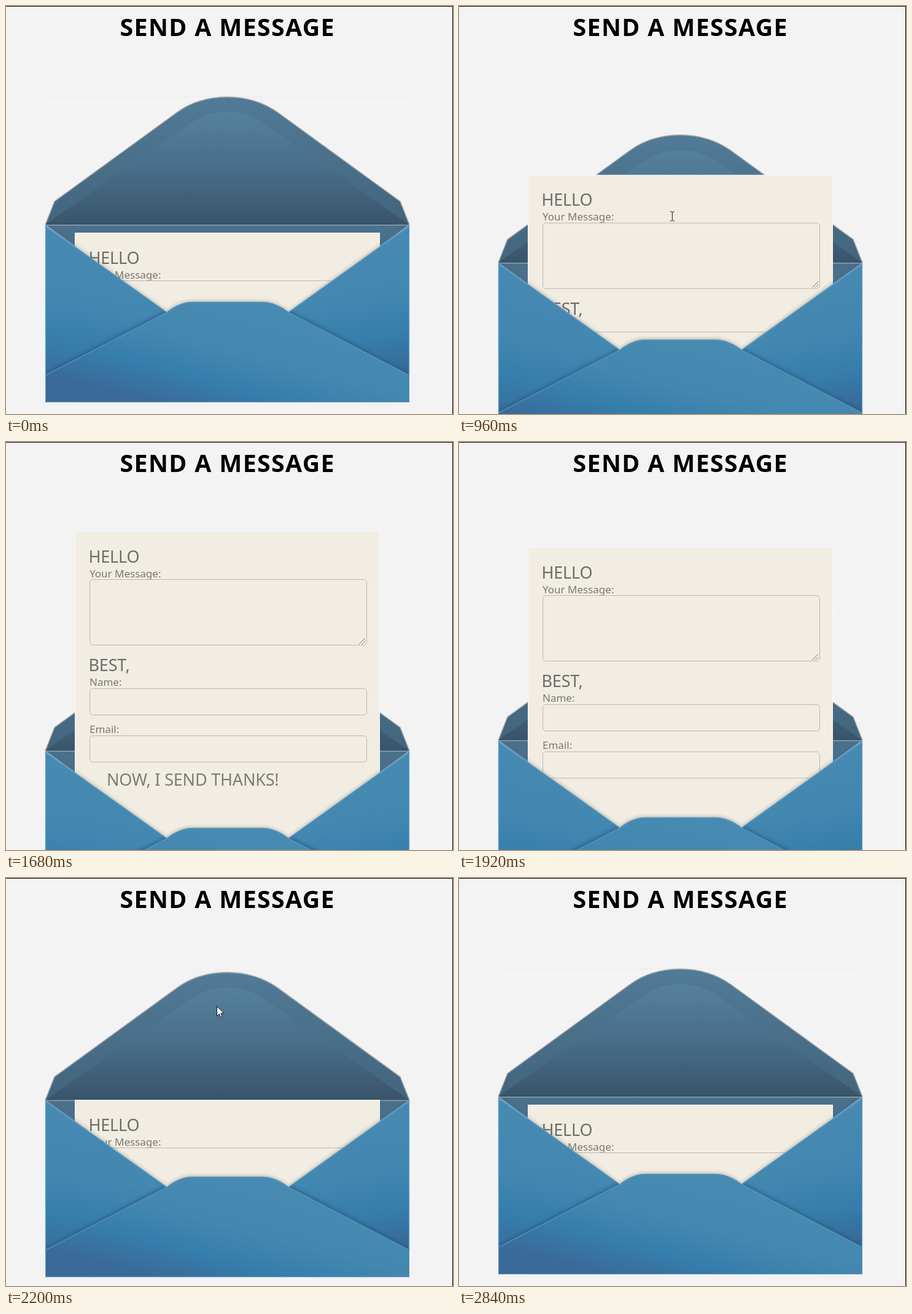
Recreate the animation shown at these times as an HTML page. Size 728 by 666 pixels, loop 2.92 s.

```html
<!DOCTYPE html>
<html lang="en">
<head>
<meta charset="utf-8">
<title>Send a message</title>
<style>
  html, body { margin: 0; width: 100%; height: 100%; overflow: hidden; background: #f3f3f3; }
  svg { display: block; width: 728px; height: 666px; font-family: "Noto Sans", "Open Sans", sans-serif; }
  .title { font-size: 39.3px; font-weight: 700; letter-spacing: 1.35px; }
  .big { font-size: 27px; letter-spacing: -.2px; fill: #6c6c6a; }
  .label { font-size: 17px; fill: #797774; }
  .field { fill: none; stroke: #bdb6ae; }

  /* --nudge: small settled offset, --open: fully pulled out */
  .back, .front, .letter { animation: slide 2920ms linear infinite; }
  .back { --nudge: 1px; --open: 147px; }
  .front { --nudge: 0px; --open: 147px; }
  .letter { --nudge: -1px; --open: -224px; }
  @keyframes slide {
    0%, 2.74% { transform: translateY(0); }
    5.48% { transform: translateY(var(--nudge)); }
    26.1% { transform: translateY(var(--nudge)); animation-timing-function: ease-in-out; }
    41.16% { transform: translateY(var(--open)); }
    62.19% { transform: translateY(var(--open)); animation-timing-function: ease-in-out; }
    77.26%, 84.93% { transform: translateY(var(--nudge)); }
    86.3%, 100% { transform: translateY(0); }
  }

  .thanks { opacity: 0; animation: thanks 2920ms ease-in-out infinite; }
  @keyframes thanks {
    0%, 41.1% { opacity: 0; }
    47.95%, 58.2% { opacity: .88; }
    66.4%, 100% { opacity: 0; }
  }

  .mouse { animation: move 2920ms linear infinite; }
  @keyframes move {
    0%, 17.81% { transform: translate(693px, 648px); }
    26.03% { transform: translate(377px, 411px); }
    34.25%, 50.68% { transform: translate(341px, 330px); }
    56.16%, 72.6% { transform: translate(343px, 36px); }
    78.77%, 84.93% { transform: translate(343px, 420px); }
    96.58%, 100% { transform: translate(682px, 660px); }
  }
  .arrow { animation: arrow 2920ms step-end infinite; }
  @keyframes arrow {
    0% { visibility: hidden; }
    17.81% { visibility: visible; }
    31.5% { visibility: hidden; }
    75.2% { visibility: visible; }
    96.5% { visibility: hidden; }
  }
  .beam { animation: beam 2920ms step-end infinite; }
  @keyframes beam {
    0% { visibility: hidden; }
    31.5% { visibility: visible; }
    54.7% { visibility: hidden; }
  }
</style>
</head>
<body>
<svg viewBox="0 0 728 666">
  <defs>
    <linearGradient id="flap" gradientUnits="userSpaceOnUse" x1="0" y1="148" x2="0" y2="358">
      <stop offset="0" stop-color="#517b97"/>
      <stop offset="1" stop-color="#43647d"/>
    </linearGradient>
    <linearGradient id="inner" gradientUnits="userSpaceOnUse" x1="0" y1="173" x2="0" y2="358">
      <stop offset="0" stop-color="#55819c"/>
      <stop offset=".5" stop-color="#496e89"/>
      <stop offset="1" stop-color="#39546a"/>
    </linearGradient>
    <linearGradient id="left" gradientUnits="userSpaceOnUse" x1="130" y1="370" x2="84" y2="612">
      <stop offset="0" stop-color="#4789b1"/>
      <stop offset=".45" stop-color="#4388b1"/>
      <stop offset=".75" stop-color="#367dab"/>
      <stop offset="1" stop-color="#396d9b"/>
    </linearGradient>
    <linearGradient id="right" gradientUnits="userSpaceOnUse" x1="590" y1="370" x2="637" y2="612">
      <stop offset="0" stop-color="#4789b1"/>
      <stop offset=".4" stop-color="#4388b1"/>
      <stop offset=".7" stop-color="#367dab"/>
      <stop offset="1" stop-color="#386592"/>
    </linearGradient>
    <linearGradient id="pocket" gradientUnits="userSpaceOnUse" x1="380" y1="483" x2="330" y2="672">
      <stop offset="0" stop-color="#478ab2"/>
      <stop offset=".42" stop-color="#4488b0"/>
      <stop offset=".7" stop-color="#367eac"/>
      <stop offset="1" stop-color="#3a6a99"/>
    </linearGradient>
    <filter id="soft" x="-10%" y="-10%" width="120%" height="120%">
      <feGaussianBlur stdDeviation="2.5"/>
    </filter>
    <clipPath id="sides">
      <path d="M64 358L262 500L64 604ZM657 358L460 500L657 604Z"/>
    </clipPath>
  </defs>

  <rect width="728" height="666" fill="#f3f3f3"/>
  <text class="title" x="360.700" y="49" text-anchor="middle">SEND A MESSAGE</text>

  <g class="back">
    <path d="M64 147.5H657" stroke="#ededee"/>
    <path d="M64 357L79 319L278 174Q313 148.500 360 148.500T443 174L642 319L657 357"
          fill="url(#flap)" stroke="#a5a8a8" stroke-width="1.5"/>
    <path d="M64 357L297 194Q326 173 360 173T424 194L657 357Z" fill="url(#inner)"/>
    <path d="M65 357.500H656L460 500H262Z" fill="#4a708c"/>
    <path d="M65 358.500H656" stroke="#587f9a"/>
  </g>

  <g class="letter">
    <rect x="112" y="370" width="497" height="520" fill="#f2ede3"/>
    <path d="M112.500 890V370.500H608.500V890" fill="none" stroke="#fbf9f5"/>
    <text class="big" x="134.500" y="420.500">HELLO</text>
    <text class="label" x="136" y="444.500">Your Message:</text>
    <rect class="field" x="136.500" y="448.500" width="451" height="107" rx="5"/>
    <path d="M575 554L585 544M580 554L585 549" stroke="#77736f"/>
    <text class="big" x="134.500" y="598">BEST,</text>
    <text class="label" x="136" y="622">Name:</text>
    <rect class="field" x="136.500" y="626.500" width="451" height="43" rx="5"/>
    <text class="label" x="136" y="699">Email:</text>
    <rect class="field" x="136.500" y="703.500" width="451" height="43" rx="5"/>
    <text class="big thanks" x="164" y="785">NOW, I SEND THANKS!</text>
  </g>

  <g class="front">
    <path d="M66 359L262 500Q281 483 304 483H416Q440 483 460 500L655 359"
          fill="none" stroke="#6b5a4c" stroke-opacity=".35" stroke-width="4" filter="url(#soft)"/>
    <path d="M64 358L262 500L64 604Z" fill="url(#left)"/>
    <path d="M657 358L460 500L657 604Z" fill="url(#right)"/>
    <g clip-path="url(#sides)">
      <path d="M64 602L262 499M657 602L460 499" stroke="#28527f" stroke-opacity=".6"
            stroke-width="6" filter="url(#soft)"/>
    </g>
    <path d="M64.500 604V359L262 500M656.500 604V359L460 500" fill="none" stroke="#5c9fca" stroke-width="1.3"/>
    <path d="M65 360L112 393M656 360L609 393" stroke="#559bcb" stroke-width="2.500"/>
    <path d="M64 603L262 500Q283 483 304 483H416Q439 483 460 500L657 603V647H64Z" fill="url(#pocket)"/>
    <path d="M64 603L262 500Q283 483.500 304 483.500H416Q439 483.500 460 500L657 603"
          fill="none" stroke="#5697bf" stroke-width="1.4"/>
    <path d="M64.500 603V646.500H656.500V603" fill="none" stroke="#5b98bf"/>
    <rect x="60" y="647.500" width="602" height="300" fill="#f3f3f3"/>
  </g>

  <g class="mouse">
    <path class="arrow" d="M.5 .5V16.500L4.300 13L6.800 18.700L9.200 17.600L6.700 12H11.700Z"
          fill="#fff" stroke="#111"/>
    <path class="beam" d="M-3 -7.500H-1L.5 -6.500L2 -7.500H4M.5 -6.500V6.500M-3 7.500H-1L.5 6.500L2 7.500H4"
          fill="none" stroke="#111"/>
  </g>

  <path d="M0 .5H727.500V666" fill="none" stroke="#000"/>
</svg>
</body>
</html>
```
